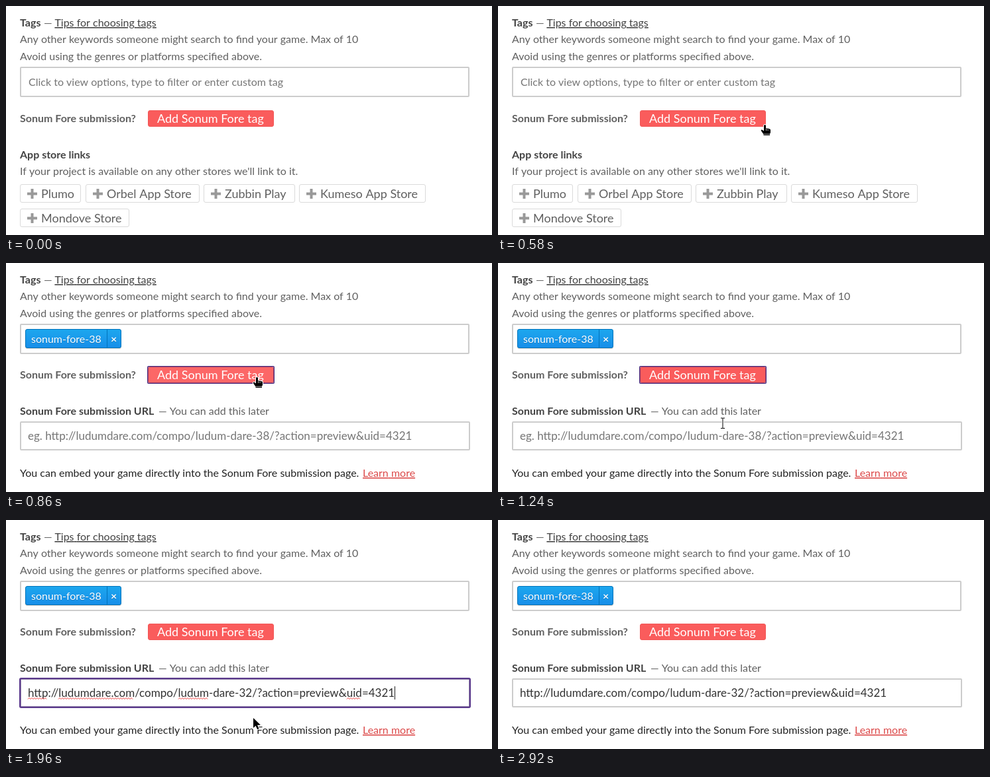
These frames come from a looping animation (733 by 347 pixels, 3.08 s). An HTML page:

```html
<!DOCTYPE html>
<html lang="en">
<head>
<meta charset="utf-8">
<title>Tag form</title>
<style>
  html, body { margin: 0; width: 100%; height: 100%; overflow: hidden; background: #fff; }
  svg { display: block; width: 733px; height: 347px; }
  text { font: 16px Lato, sans-serif; fill: #606060; white-space: pre; }
  .gap { font-kerning: none; }
  .bold { font-weight: 700; }
  .dark { fill: #434343; }
  .hint { fill: #757575; }
  .url { font-size: 17px; }
  .big { font-size: 18px; }
  .link { text-decoration: underline; text-decoration-skip-ink: none; }
  .white { fill: #fff; }
  .chip { text-shadow: 0 1px 0 rgba(0, 51, 83, .3); }
  .field { fill: #fff; stroke: #ccc; stroke-width: 2; }
  .store { fill: #fff; stroke: #dadada; }
  .plus { stroke: #999; stroke-width: 4; }
  .pointer { stroke: #fff; stroke-width: 2; paint-order: stroke; stroke-linejoin: round; }
</style>
</head>
<body>
<svg viewBox="0 0 733 347">
  <defs>
    <linearGradient id="blue" x2="0" y2="1">
      <stop stop-color="#1da7ee"/><stop offset="1" stop-color="#178ee9"/>
    </linearGradient>
  </defs>

  <text x="21" y="31" class="bold dark">Tags</text>
  <text x="57" y="31">—</text>
  <text x="73.4" y="31" class="link dark">Tips for choosing tags</text>
  <text x="21" y="56">Any other keywords someone might search to find your game. Max of 10</text>
  <text x="21" y="82">Avoid using the genres or platforms specified above.</text>
  <rect x="22" y="93" width="676" height="44" rx="1" class="field"/>

  <g id="submit">
    <text x="21" y="176" class="bold">Sonum Fore submission?</text>
    <rect id="button" x="214.5" y="158.5" width="189" height="24" rx="2.5" fill="#fa5c5c" stroke="#f25656"/>
    <rect id="ring" x="213.75" y="157.75" width="190.5" height="25.5" rx="1" fill="none" stroke="#4b2d7f" stroke-width="1.5"/>
    <text x="228" y="177" class="big white">Add Sonum Fore tag</text>
  </g>

  <g id="before">
    <text x="34" y="121" class="hint">Click to view options, type to filter or enter custom tag</text>
    <text x="21" y="231" class="bold dark">App store links</text>
    <text x="21" y="256">If your project is available on any other stores we'll link to it.</text>
    <g id="stores"></g>
  </g>

  <g id="after">
    <rect x="29" y="101" width="145" height="29" rx="3" fill="#ccc"/>
    <rect x="29.5" y="100.5" width="144" height="28" rx="2.5" fill="url(#blue)" stroke="#0073bb"/>
    <path d="M152.5 101v27" stroke="#0073bb"/>
    <text x="38" y="121" class="white chip">sonum-fore-38</text>
    <text x="158" y="121" class="white chip bold">×</text>

    <text x="21" y="230" class="bold dark">Sonum Fore submission URL</text>
    <text x="230" y="230">— You can add this later</text>
    <rect x="22" y="241" width="677" height="42" rx="1" class="field"/>
    <rect id="focus" x="21.25" y="240.25" width="678.5" height="43.5" rx="1.5" fill="none" stroke="#5b3a8c" stroke-width="2.5"/>
    <text id="hint" x="33" y="268" class="url hint">eg. http://ludumdare.com/compo/ludum-dare-38/?action=preview&amp;uid=4321</text>
    <text id="value" x="33" y="268" class="url" style="fill:#333">http://ludumdare.com/compo/ludum-dare-32/?action=preview&amp;uid=4321</text>
    <path id="squiggle" fill="none" stroke="#f03a3a"/>
    <path id="caret" stroke="#222"/>

    <text x="21" y="324" style="fill:#222">You can embed your game directly into the Sonum Fore submission page.</text>
    <text x="538" y="324" class="link" style="fill:#dc4a4a">Learn more</text>
  </g>

  <g id="cursor">
    <path id="arrow" class="pointer" d="M0 0v15l3.6-3.3 2.5 5.6 2.4-1-2.5-5.5h5z"/>
    <g id="hand">
      <path class="pointer" d="M-2 0q1.500-2 3 0v4.500q1.500-.8 2.500.3 1.500-.6 2.500.5 2-.2 2 1.500v4l-1.500 3.200h-8.500l-3.500-5q-1.500-2 0-2.400 1.500 0 3.500 2zM-2.500 13h9.500v2h-9.500z"/>
      <path d="M1.500 5v3M4 5.500v2.500M-2.500 13.200h9.500" stroke="#fff" stroke-width=".7"/>
    </g>
    <path id="beam" class="pointer" d="M-3-8.500h2.500l.5.500.5-.5h2.500v1h-2.500v14.500h2.500v1h-2.500l-.5-.5-.5.5h-2.500v-1h2.500v-14.500h-2.500z"/>
  </g>
</svg>

<script>
const LOOP = 3080;
const el = id => document.getElementById(id);
const show = (id, on) => el(id).style.display = on ? "" : "none";
const clamp = v => Math.min(1, Math.max(0, v));
const mix = (a, b, k) => a + (b - a) * k;
const easeOut = (k, p) => 1 - (1 - k) ** p;

// label, left, top, width
const stores = [
  ["Plumo", 21, 270, 92],
  ["Orbel App Store", 120, 270, 172],
  ["Zubbin Play", 298, 270, 138],
  ["Kumeso App Store", 442, 270, 191],
  ["Mondove Store", 21, 307, 165]
];
el("stores").innerHTML = stores.map(([label, x, y, w]) =>
  `<rect x="${x + .5}" y="${y + .5}" width="${w - 1}" height="27" rx="2.5" class="store"/>
   <path d="M${x + 11} ${y + 14.5}h15m-7.500-7.500v15" class="plus"/>
   <text x="${x + 32}" y="${y + 21}" class="big">${label}</text>`).join("");

// no kerning between a word and the space beside it
for (const text of document.querySelectorAll("text"))
  text.innerHTML = text.innerHTML.replaceAll(" ", '<tspan class="gap"> </tspan>');

// misspelt words: left, right
el("squiggle").setAttribute("d", [[33, 63], [79, 194], [260, 305], [514, 537]].map(([a, b]) =>
  `M${a} 271.5` + "l2-2 2 2".repeat((b - a) / 4)).join(""));

function pointerAt(t) {
  if (t < 1040) {
    const k = easeOut(clamp((t - 380) / 340), 3);
    return [mix(729, 379, k), mix(270, 174, k)];
  }
  if (t < 1900) {
    const k = clamp((t - 1040) / 400);
    return [mix(379, 329, easeOut(k, 2.3)), mix(174, 277, easeOut(k, 1.6))];
  }
  const k = clamp((t - 1880) / 220);
  return [329 + 417 * k ** 2.22, 277 + 72 * k ** 1.117];
}

function draw(t) {
  const clicked = t >= 860, pasted = t >= 1700;
  const focused = t >= 1480 && t < 2920;
  show("before", !clicked);
  show("after", clicked);
  show("ring", t >= 780 && t < 1480);
  show("hint", !pasted);
  show("value", pasted);
  show("focus", focused);
  show("squiggle", pasted && focused);
  show("caret", focused && (t < 2400 || t >= 2760));
  el("caret").setAttribute("d", `M${pasted ? 586.5 : 33.5} 252v20`);
  el("submit").setAttribute("transform", `translate(0 ${clicked ? -1 : 0})`);

  const [x, y] = pointerAt(t).map(Math.round);
  const overButton = x >= 214 && x <= 404 && y >= 157 && y <= 183;
  const overField = clicked && x < 700 && y >= 240 && y <= 284;
  const glow = overButton ? clamp((t - 580) / 120) : 0;
  el("button").setAttribute("fill", `rgb(${mix(250, 252, glow)} ${mix(92, 103, glow)} ${mix(92, 103, glow)})`);
  show("cursor", t >= 380 && t < 2100);
  show("hand", overButton);
  show("beam", overField);
  show("arrow", !overButton && !overField);
  el("cursor").setAttribute("transform", `translate(${x} ${y})`);
}

let start;
function tick(now) {
  start ??= now;
  const t = (now - start) % LOOP;
  draw(Math.floor(t / 20) * 20);
  requestAnimationFrame(tick);
}
draw(0);
requestAnimationFrame(tick);
</script>
</body>
</html>
```
